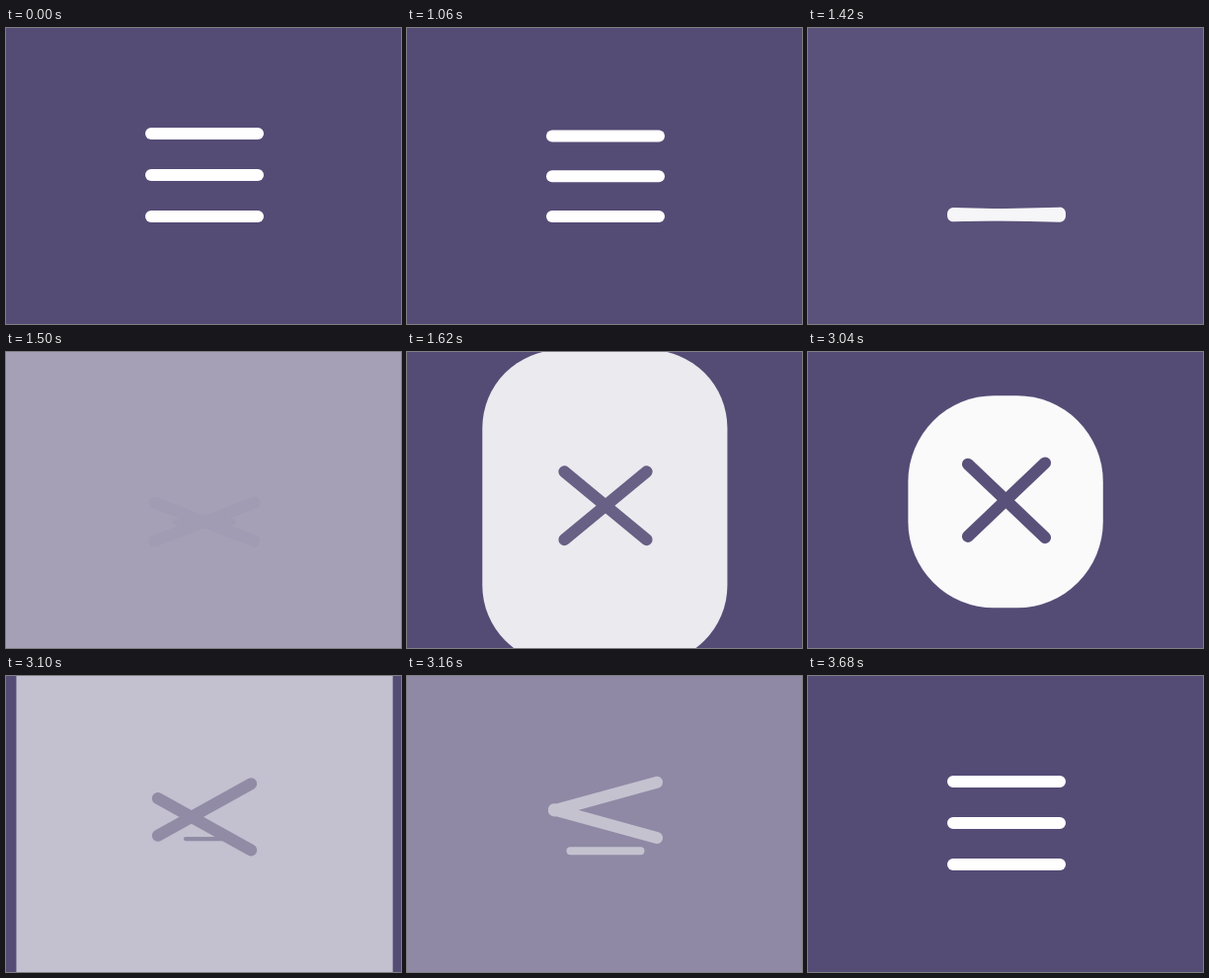
Animation, 400 px wide and 300 px high, one loop 4540 ms. Source, as an HTML page with a canvas:

```html
<!DOCTYPE html>
<html lang="en">
<head>
<meta charset="utf-8">
<title>Menu button</title>
<style>
  html, body { margin: 0; width: 100%; height: 100%; overflow: hidden; background: #554c76; }
  canvas { display: block; width: 400px; height: 300px; }
</style>
</head>
<body>
<canvas id="stage" width="400" height="300"></canvas>
<script>
const ctx = document.getElementById('stage').getContext('2d');
const LOOP = 4540, STEP = 20;
const GATHER = 1043, OPEN = 1402.5, CLOSE = 3023;
const PURPLE = [85, 76, 118], WHITE = [255, 255, 255];
const BAR = { x: 201, width: 120, height: 12 };
const TOP = 107, MIDDLE = 149, BOTTOM = 191, CROSS = 151;

const lerp = (a, b, p) => a + (b - a) * p;
const mix = (a, b, p) => `rgb(${a.map((v, i) => Math.round(lerp(v, b[i], p)))})`;

// Damped spring with tension 250 and friction 30, time in ms.
function spring(ms) {
  if (ms <= 0) return 0;
  const s = ms / 1000;
  return 1 - Math.exp(-15 * s) * (Math.cos(5 * s) + 3 * Math.sin(5 * s));
}

function fillRound(x, y, w, h, r, color) {
  ctx.fillStyle = color;
  ctx.beginPath();
  ctx.roundRect(x, y, w, h, Math.max(0, r));
  ctx.fill();
}

// p = 0: covers the screen, p = 1: round button.
function drawPanel(p) {
  fillRound(lerp(-172, 110, p), lerp(-460, 60, p), lerp(750, 180, p), lerp(1334, 180, p),
    90 * p, mix(PURPLE, WHITE, Math.min(1, p)));
}

function drawBar(y, degrees, scale, color) {
  if (scale < 0.005) return;
  const { x, width, height } = BAR;
  ctx.save();
  ctx.translate(x, y);
  ctx.rotate(degrees * Math.PI / 180);
  ctx.scale(scale, scale);
  fillRound(-width / 2, -height / 2, width, height, height / 2, color);
  ctx.restore();
}

function draw(t) {
  const closing = t >= CLOSE;
  const gather = closing ? 0 : spring(t - GATHER);
  const cross = closing ? 1 - spring(t - CLOSE) : spring(t - OPEN);
  // While opening, the bars darken a little ahead of the panel.
  const lead = closing ? 0 : 0.65 * cross * (1 - cross) ** 2;
  const ink = mix(WHITE, PURPLE, Math.min(1, Math.max(0, cross + lead)));
  const barY = home => lerp(lerp(home, BOTTOM, gather), CROSS, cross);

  ctx.fillStyle = mix(PURPLE, PURPLE, 0);
  ctx.fillRect(0, 0, 400, 300);
  drawPanel(Math.max(0, cross));
  drawBar(barY(BOTTOM), 0, 1 - cross, ink);
  drawBar(barY(TOP), -45 * cross, 1, ink);
  drawBar(barY(MIDDLE), 45 * cross, 1, ink);
}

const start = performance.now();
function tick() {
  const t = (performance.now() - start) % LOOP;
  draw(Math.floor(t / STEP) * STEP);
  requestAnimationFrame(tick);
}
tick();
</script>
</body>
</html>
```
